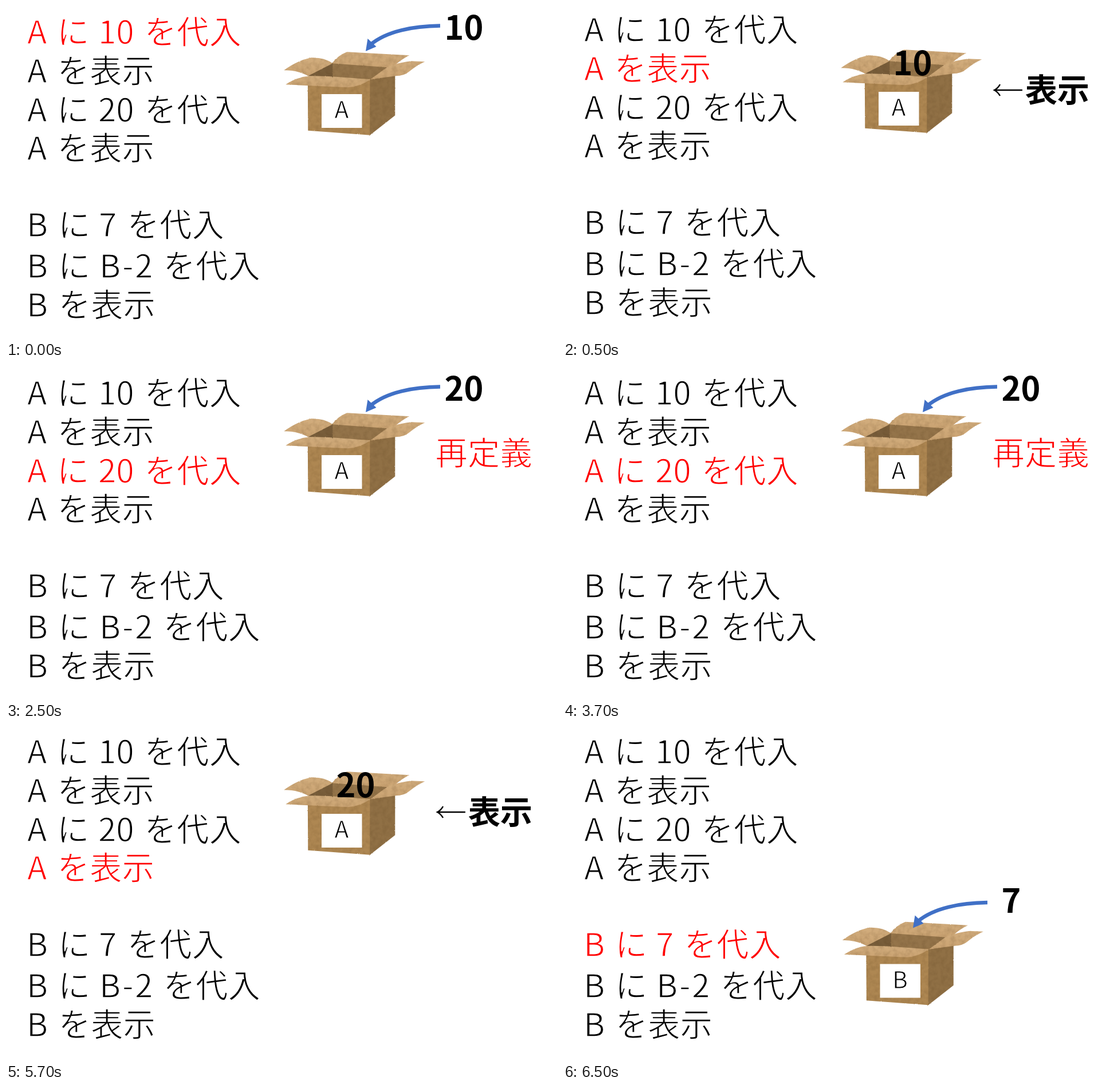
Write an HTML page that moves like this. It is 962 by 582 pixels and loops after 8 s.

```html
<!DOCTYPE html>
<html lang="ja">
<head>
<meta charset="utf-8">
<title>変数と代入</title>
<style>
  html, body { margin: 0; width: 100%; height: 100%; overflow: hidden; background: #fff; }
  svg { display: block; width: 100%; height: 100%; }
  /* The white outline thins the regular weight to a light one */
  text {
    font: 300 56.5px "Noto Sans CJK JP", "Noto Sans CJK", "Noto Sans", sans-serif;
    stroke: #fff; stroke-width: 1.4px;
  }
  .bold { font-weight: 700; font-size: 56px; stroke: none; }
  #value { font-size: 57.5px; }
  #label { font-size: 41px; text-anchor: middle; stroke-width: 1px; }
</style>
</head>
<body>
<svg viewBox="0 0 962 582" xmlns="http://www.w3.org/2000/svg">
  <defs>
    <filter id="paper" x="-5%" y="-5%" width="110%" height="110%" color-interpolation-filters="sRGB">
      <feTurbulence type="fractalNoise" baseFrequency=".3" numOctaves="2" seed="4" result="rough"/>
      <feDisplacementMap in="SourceGraphic" in2="rough" scale="2" xChannelSelector="R" yChannelSelector="G" result="shape"/>
      <feTurbulence type="fractalNoise" baseFrequency=".12" numOctaves="3" seed="9"/>
      <feColorMatrix values="0 0 0 0 .3  0 0 0 0 .2  0 0 0 0 .08  .3 0 0 0 -.11"/>
      <feComposite in2="shape" operator="in" result="grain"/>
      <feMerge><feMergeNode in="shape"/><feMergeNode in="grain"/></feMerge>
    </filter>
    <linearGradient id="flap" x1="0" y1="0" x2="0" y2="1">
      <stop offset="0" stop-color="#d2ad7d"/><stop offset="1" stop-color="#caa372"/>
    </linearGradient>
  </defs>
  <g id="program"></g>
  <g id="box">
    <g filter="url(#paper)" transform="translate(-.7 -.7)">
      <path fill="#94744a" d="M570 100L672 105L637 130L528 123Z"/>
      <path fill="#785d3a" d="M571 100V126L528 123Z"/>
      <path fill="#ae8752" d="M527.500 128L637 128V226.500L528 218.500Z"/>
      <path fill="#907045" d="M636 128L680 116V192L636 226.500Z"/>
      <g fill="url(#flap)">
        <path d="M486 113Q509 96 533 91Q556 90 571 101L528 123Q511 113 486 113Z"/>
        <path d="M570 101Q580 87 596 81L705 87Q691 94 680 104L667 108Z"/>
        <path d="M637 129L667 107Q688 99 708 97L732 98Q717 105 705 115Q696 123 681 123Z"/>
        <path d="M489 138Q508 125 530 123Q556 122 637 129Q618 142 598 143Z"/>
      </g>
    </g>
    <path fill="#fff" d="M551 154h70.500v59h-70.500z"/>
    <text id="label" x="586" y="196"></text>
  </g>
  <g id="arrow">
    <path fill="none" stroke="#4070c6" stroke-width="6.500" d="M758 34.500C711 35 665 44 637 67"/>
    <path fill="#4070c6" d="M628 79L631.500 57L646.500 71Z"/>
  </g>
  <text id="value" class="bold"></text>
  <g id="shown">
    <path fill="none" stroke="#000" stroke-width="2.400" d="M802 147H754M763 137Q759 144 753 147Q759 150 763 157"/>
    <text class="bold" x="807" y="167">表示</text>
  </g>
  <text id="redefined" x="749.500" y="171" fill="#f00">再定義</text>
</svg>
<script>
  const el = id => document.getElementById(id);

  // Each line: baseline, then pairs of x and text
  const lines = [
    [66, 37, "A", 89, "に", 161, "10", 241.5, "を代入"],
    [134, 37, "A", 89.5, "を表示"],
    [202, 37, "A", 89, "に", 161, "20", 241.5, "を代入"],
    [269, 37, "A", 89.5, "を表示"],
    [403, 36, "B", 91, "に", 162, "7", 211.5, "を代入"],
    [475, 36, "B", 91, "に", 163, "B", 203, "-", 225, "2", 274.5, "を代入"],
    [543, 36, "B", 91.5, "を表示"]
  ];

  const steps = [
    { at: 0, line: 0, value: "10", x: 765.5, y: 59, arrow: [0, 0] },
    { at: 500, line: 1, value: "10", x: 576.5, y: 121, lift: -4, shown: true },
    { at: 2500, line: 2, value: "20", x: 765.5, y: 59, arrow: [0, 0], redefined: true },
    { at: 4500, line: 3, value: "20", x: 576.5, y: 121, lift: -4, shown: true },
    { at: 6500, line: 4, value: "7", x: 765.5, y: 323, lift: -4, arrow: [-17, 270.5], box: [2.5, 258.5], name: "B" }
  ];
  const loop = 8000;

  const rows = lines.map(([y, ...runs]) => {
    const row = document.createElementNS("http://www.w3.org/2000/svg", "g");
    for (let i = 0; i < runs.length; i += 2) {
      const text = document.createElementNS(row.namespaceURI, "text");
      text.setAttribute("x", runs[i]);
      text.setAttribute("y", y);
      text.textContent = runs[i + 1];
      row.append(text);
    }
    el("program").append(row);
    return row;
  });

  const move = (id, [x, y]) => el(id).setAttribute("transform", `translate(${x} ${y})`);
  const show = (id, on) => el(id).setAttribute("visibility", on ? "visible" : "hidden");

  let current;
  function draw(time) {
    const step = steps.findLast(s => s.at <= time % loop);
    if (step === current) return;
    current = step;
    const lift = step.lift || 0;
    rows.forEach((row, i) => row.setAttribute("fill", i === step.line ? "#f00" : "#000"));
    move("program", [0, lift]);
    move("box", step.box || [0, lift]);
    move("arrow", step.arrow || [0, 0]);
    move("value", [step.x, step.y]);
    el("value").textContent = step.value;
    el("label").textContent = step.name || "A";
    show("arrow", step.arrow);
    show("shown", step.shown);
    show("redefined", step.redefined);
  }

  const start = performance.now();
  function tick() {
    draw(performance.now() - start);
    requestAnimationFrame(tick);
  }
  tick();
</script>
</body>
</html>
```
